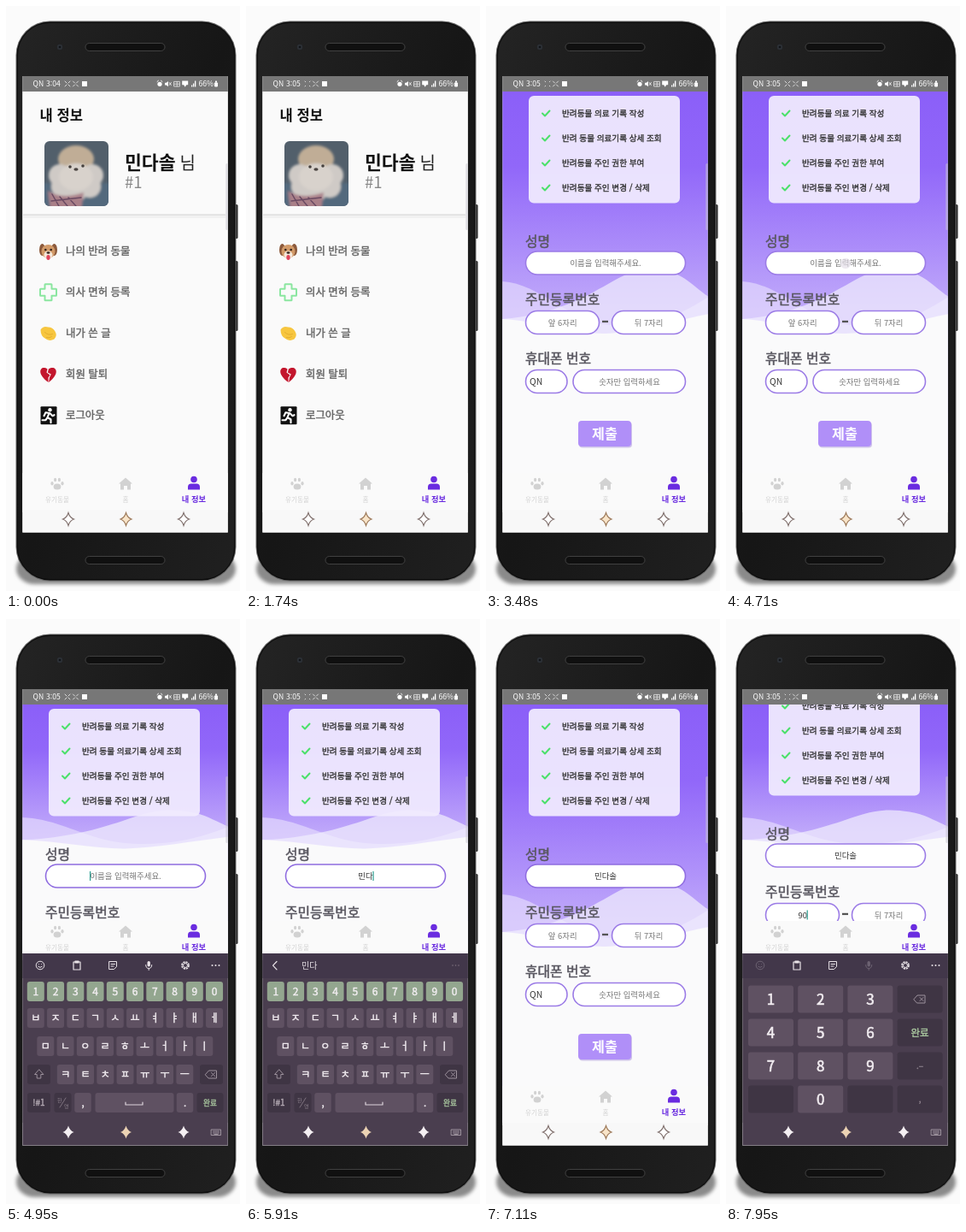
Write an HTML page that moves like this. It is 274x684 px and loops after 8000 ms.

```html
<!DOCTYPE html>
<html lang="ko">
<head>
<meta charset="utf-8">
<title>내 정보</title>
<style>
html, body { margin: 0; width: 100%; height: 100%; overflow: hidden; background: #fbfbfb; }
svg { display: block; width: 100vw; height: 100vh; }
text { font-family: 'Noto Sans CJK KR', 'Noto Sans KR', 'Noto Sans CJK JP', 'Noto Sans', sans-serif; white-space: pre; }
</style>
</head>
<body>
<svg id="stage" viewBox="0 0 274 684" xmlns="http://www.w3.org/2000/svg"></svg>
<script>
const LOOP = 8000, NAME = '민다솔', BRAND = '두두고리', CARRIER = 'QN';
const VIEW = 489, SMALL_VIEW = 291;

// weight 500 is drawn as regular with a thin outline
const text = (x, y, size, str, fill = '#333', weight = 400, anchor = 'start', id = '') =>
  `<text x="${x}" y="${y}" font-size="${size}" fill="${fill}" font-weight="${weight === 500 ? 400 : weight}" text-anchor="${anchor}"` +
  `${weight === 500 ? ` stroke="${fill}" stroke-width="${(size * .035).toFixed(2)}"` : ''}${id && ` id="${id}"`}>${str}</text>`;
const mid = (x, y, size, str, fill, weight, id) => text(x, y, size, str, fill, weight, 'middle', id);
const rect = (x, y, w, h, r, fill, more = '') =>
  `<rect x="${x}" y="${y}" width="${w}" height="${h}" rx="${r}" fill="${fill}" ${more}/>`;
const band = (y, h, fill) => rect(19, y, 242, h, 0, fill);
const dot = (x, y, r, fill, more = '') => `<circle cx="${x}" cy="${y}" r="${r}" fill="${fill}" ${more}/>`;
const oval = (x, y, rx, ry, fill) => `<ellipse cx="${x}" cy="${y}" rx="${rx}" ry="${ry}" fill="${fill}"/>`;
const shape = (d, fill, more = '') => `<path d="${d}" fill="${fill}" ${more}/>`;
const line = (d, color, w = 1) => shape(d, 'none', `stroke="${color}" stroke-width="${w}" stroke-linecap="round" stroke-linejoin="round"`);
const group = (id, body, more = '') => `<g id="${id}" ${more}>${body}</g>`;
const at = (x, y, body) => `<g transform="translate(${x} ${y})">${body}</g>`;

const defs = `<defs>
  <linearGradient id="purple" x1="0" y1="0" x2="0" y2="1">
    <stop offset="0" stop-color="#8b5ff8"/><stop offset=".18" stop-color="#9167f9"/><stop offset=".52" stop-color="#c0a9fa"/>
  </linearGradient>
  <linearGradient id="body" x1="0" y1="0" x2="1" y2="1">
    <stop offset="0" stop-color="#242424"/><stop offset=".5" stop-color="#161616"/><stop offset="1" stop-color="#202020"/>
  </linearGradient>
  <filter id="soft" x="-10%" y="-50%" width="120%" height="200%"><feGaussianBlur stdDeviation="2"/></filter>
  <filter id="fuzzy"><feGaussianBlur stdDeviation="1.5"/></filter>
  <clipPath id="screen"><rect x="19.4" y="82" width="240.3" height="533.6"/></clipPath>
  <clipPath id="view"><rect x="19" y="100" width="242" height="489"/></clipPath>
  <clipPath id="photo"><rect x="45" y="158" width="75" height="76" rx="6"/></clipPath>
</defs>`;

function phone() {
  const pill = y => rect(93, y, 93, 9, 4.5, '#101010', 'stroke="#474747" stroke-width=".9"');
  return rect(12, 640, 257, 36, 22, '#8a8a8a', 'filter="url(#soft)"') +
    rect(267, 232, 4.5, 40, 1.5, '#2b2b2b') + rect(267, 298, 4.5, 82, 1.5, '#2b2b2b') +
    rect(11.5, 17.5, 258, 655, 40, '#6a6a6a') + rect(12.5, 18.5, 256, 653, 39, '#0c0c0c') +
    rect(14, 20, 253, 650, 37, 'url(#body)') +
    pill(43.5) + pill(643.5) + dot(63, 48, 3.2, '#2c3036') + dot(63, 48, 1.3, '#111418');
}

function statusBar() {
  const corners = (x, d) => line(`M${x - 3},${91 - 3}l${d},${d}M${x + 3},88l${-d},${d}M${x - 3},94l${d},${-d}M${x + 3},94l${-d},${-d}`, '#e8e8e8', .9);
  return band(82, 18, '#777') +
    text(31.5, 94.2, 8.6, CARRIER, '#fff') + text(47, 94.2, 8.6, '', '#fff', 400, 'start', 'clock') +
    group('iconIn', corners(72, 2)) + group('iconOut', corners(72, .7)) + corners(81.5, 2) +
    rect(89, 88, 6, 6, 0, '#fff') +
    dot(180, 91.3, 2.6, '#fff') + line('M177,88.5l1.4,-1.2M183,88.5l-1.4,-1.2', '#fff') +
    shape('M186,89.8h1.7l2.2,-1.9v6.4l-2.2,-1.9h-1.7z', '#fff') + line('M191.3,89.6l2,2.8m0,-2.8l-2,2.8', '#fff', .8) +
    line('M197,88.4h6.4v5.6h-6.4zM197,91.2h6.4M200.2,88.4v5.6', '#e8e8e8', .8) +
    shape('M206.2,87.6h7v4.6h-2l-1.5,2.6l-1.5,-2.6h-2z', '#fff') +
    shape('M217,94.5v-2h1.3v2zM219,94.5v-4h1.3v4zM221,94.5v-7h1.3v7z', '#fff') +
    text(225.5, 94.2, 8.6, '66%', '#fff') + rect(244, 89.4, 4, 5, .8, '#fff') + rect(245, 87.6, 2, 2, 0, '#fff');
}

function photo() {
  const tufts = [[63, 198], [101, 198], [66, 211], [98, 211], [82, 216]];
  return `<g clip-path="url(#photo)">` + rect(45, 158, 75, 76, 0, '#525f6b') + `<g filter="url(#fuzzy)">` +
    rect(40, 207, 85, 32, 0, '#53697d') + oval(82, 179, 21, 16, '#c0ad96') +
    tufts.map(([x, y]) => dot(x, y, 13, '#cfcac6')).join('') + oval(82, 200, 20, 16, '#d8d2cc') +
    shape('M49,216Q66,227 91,218L88,238H52z', '#a97f88') + '</g>' +
    line('M54,220L62,234M63,223L72,234M73,224L82,234M53,228L88,224', '#6b4b63', 1.5) +
    dot(75, 188, 1.8, '#45403d') + dot(90, 187, 1.8, '#45403d') + oval(82, 191, 2.6, 1.8, '#4b4542') + '</g>';
}

function profile() {
  const icons = [
    oval(-7, -2, 3.5, 7, '#8c5a3c') + oval(7, -2, 3.5, 7, '#8c5a3c') + dot(0, 0, 8, '#d29a68') + oval(0, 4, 5, 4.5, '#f5e8da') +
      dot(-3.2, -2, 1.3, '#33221c') + dot(3.2, -2, 1.3, '#33221c') + oval(0, 1.5, 2, 1.3, '#33221c') + oval(0, 7, 2.2, 3, '#e0455c'),
    line('M-3.5,-9.5H3.5Q4,-9.5 4,-9V-4H9Q9.5,-4 9.5,-3.5V3.5Q9.5,4 9,4H4V9Q4,9.5 3.5,9.5H-3.5Q-4,9.5 -4,9V4H-9Q-9.5,4 -9.5,3.5V-3.5Q-9.5,-4 -9,-4H-4V-9Q-4,-9.5 -3.5,-9.5z', '#8be6a0', 2),
    shape('M-9,-4Q-6,-9 0,-7Q5,-7 8,-2Q11,3 7,7Q1,10 -4,6Q-9,3 -9,-4z', '#f7c63f') + line('M-4,-1Q0,3 5,1M-2,5Q2,6 4,4', '#e3ad30'),
    shape('M0,9.5C-15,-1 -9,-11 -1,-6L-2,-2L2,1L0,4zM.6,9.5L1.4,4L3.3,.2L-.6,-2L.4,-6C9,-11 15,-1 .6,9.5z', '#c3162d'),
    rect(-9, -10, 19, 21, 1, '#111') + dot(2, -6, 2.2, '#fff') + line('M1,-2L-1,3L3,5V9M-1,3L-3,6H-7M-5,1L-3,-3L2,-2L5,1L7,0', '#fff', 2.1),
  ];
  const labels = ['나의 반려 동물', '의사 면허 등록', '내가 쓴 글', '회원 탈퇴', '로그아웃'];
  return band(100, 489, '#fafafa') + text(39.5, 134, 16.6, '내 정보', '#111', 700) + photo() +
    text(139, 190.5, 21.6, NAME, '#111', 700) + text(203.5, 190.5, 20, '님', '#222', 300) + text(139, 213, 18.5, '#1', '#888', 400) +
    rect(20, 243.5, 237, 1.2, 0, '#d8d8d8') + rect(20, 245, 237, 3, 0, '#f1f1f1') +
    icons.map((icon, i) => at(49.5, 287 + 47.8 * i, icon) + text(70, 291.3 + 47.8 * i, 12.4, labels[i], '#666', 500)).join('');
}

function backdrop() {
  return group('backdrop', rect(-1, 0, 242, VIEW, 0, 'url(#purple)') +
    shape('M-1,222C45,225 75,268 125,273S205,262 241,240V489H-1z', '#e6defd', 'opacity=".65"') +
    shape('M-1,266C60,262 100,238 130,221S175,206 195,211S225,230 241,240V489H-1z', '#f3effe', 'opacity=".7"') +
    shape('M-1,266C40,268 85,284 120,283S200,268 241,260V489H-1z', '#fafafb'));
}

function form() {
  const checks = ['반려동물 의료 기록 작성', '반려 동물 의료기록 상세 조회', '반려동물 주인 권한 부여', '반려동물 주인 변경 / 삭제'];
  const field = (x, y, w, id = '') => rect(x, y, w, 27, 13.5, '#fff', `stroke="#9b7be6" stroke-width="1.6" ${id && `id="${id}"`}`);
  const label = (y, str) => text(46, y, 15.8, str, '#595760', 500);
  return group('form',
    text(61, 72, 12.8, BRAND, '#fff', 700) + text(108.5, 72, 9.4, '의 공식 수의사로 인증 받으면', '#241c38', 500) +
    text(62, 84.2, 9.4, '다음 기능에 대한 권한을 부여 받습니다.', '#241c38', 500) +
    rect(50, 105, 177, 125.5, 6, '#f2ecfe', 'opacity=".93"') +
    checks.map((c, i) => line(`M66,${125.5 + 29 * i}l3,3l5.5,-6`, '#4be06a', 2) + text(89, 128.7 + 29 * i, 9.6, c, '#333', 500)).join('') +
    label(280.5, '성명') + label(349, '주민등록번호') + label(418, '휴대폰 번호') +
    field(46.5, 287, 187, 'nameBox') + field(46.5, 356.5, 86) + field(147.5, 356.5, 86) + field(46.5, 425.5, 48.5) + field(102, 425.5, 131.5) +
    rect(136, 367.8, 7, 2.3, 0, '#555') +
    mid(140, 304, 9.45, '', '#333', 400, 'nameText') + mid(89.7, 373.5, 9.4, '', '#333', 400, 'idText') +
    mid(190.5, 373.5, 9.4, '뒤 7자리', '#777') + text(51, 443.2, 10.4, CARRIER, '#333') + mid(168, 442.7, 9.4, '숫자만 입력하세요', '#777') +
    rect(0, 0, 1.2, 11, 0, '#2a9d8f', 'id="caret"') +
    rect(109, 486.5, 62, 30, 4, '#cfc3ea') + rect(108, 485, 62, 30, 4, '#b08ff8') + mid(139, 506, 16.2, '제출', '#fff', 700));
}

function tabs() {
  const gray = '#d2d2d2', on = '#6a2ce0';
  return group('tabs', band(546, 46, '#fafafa') +
    oval(60, 562, 4.4, 3.6, gray) + [[54, 558.2], [57.6, 554], [62.4, 554], [66, 558.2]].map(([x, y]) => oval(x, y, 1.6, 2.2, gray)).join('') +
    shape('M140,551.5L148,558.5H146V565.5H142V561H138V565.5H134V558.5H132z', gray) +
    dot(220, 553.5, 3.8, on) + shape('M213,565.5V562.5Q213,558.6 217,558.6H223Q227,558.6 227,562.5V565.5z', on) +
    mid(60, 579.6, 7.6, '유기동물', gray) + mid(140, 579.6, 7.6, '홈', gray) + mid(220, 580, 9.3, '내 정보', on, 700));
}

const star = (x, fill, stroke) => at(x, 600, shape('M0,-7.5Q1.7,-1.7 6.5,0Q1.7,1.7 0,7.5Q-1.7,1.7 -6.5,0Q-1.7,-1.7 0,-7.5z', fill, `stroke="${stroke}" stroke-width="1.1"`));
const navBar = () => band(589, 27, '#f8f8f8') + star(73, '#fff', '#80706d') + star(140.5, '#f8e4c8', '#9c7858') + star(208, '#fff', '#80706d');

const KEY = '#5f5162', DARK = '#3f3544', KEY_TEXT = '#f3eef2', GREEN = '#a9c79f';
const keyAt = {};

function key(cx, y, w, h, label, fill = KEY, color = KEY_TEXT, size = 11.5) {
  keyAt[label] = [cx, y + h / 2];
  return rect(cx - w / 2, y, w, h, 3, fill) + mid(cx, y + h / 2 + size * .36, size, label, color, 500);
}
const erase = (x, y) => line(`M${x - 7},${y}l4,-4.5h9v9h-9zM${x},${y - 2}l4,4m0,-4l-4,4`, '#9c919c', 1);

function hangulKeys() {
  const rows = [['1234567890', 34.8, 424], ['ㅂㅈㄷㄱㅅㅛㅕㅑㅐㅔ', 34.8, 455], ['ㅁㄴㅇㄹㅎㅗㅓㅏㅣ', 46.3, 488], ['ㅋㅌㅊㅍㅠㅜㅡ', 69.8, 521]];
  return rows.map(([chars, x, y], r) => [...chars].map((c, i) => key(x + 23.25 * i, y, 20, 23, c, r ? KEY : '#93a68f', KEY_TEXT, 12)).join('')).join('') +
    key(38.5, 521, 27, 23, '', DARK) + line('M38.5,527l-5,5.5h2.7v4.5h4.6v-4.5h2.7z', '#9c919c') +
    key(240.5, 521, 27, 23, '', DARK) + erase(240.5, 532.5) +
    key(38.5, 554, 27, 23, '!#1', DARK, '#b7adb6', 10) + key(66.5, 554, 20, 23, '', DARK) +
    text(60, 565, 6, '한', '#8e838e') + text(68, 572, 6, '영', '#8e838e') + line('M63,571l7,-11', '#8e838e', .8) +
    key(90, 554, 19.5, 23, ',') + key(150.5, 554, 92, 23, '') + line('M140,565v3h20v-3', '#ddd4dc', 1.2) +
    key(209.5, 554, 19.5, 23, '.') + key(239, 554, 31, 23, '완료', DARK, GREEN, 8.6);
}

function numberKeys() {
  const labels = ['1', '2', '3', '', '4', '5', '6', '완료', '7', '8', '9', '.–', '', '0', '', ','];
  return labels.map((c, i) => {
    const col = i % 4, y = 428.5 + 39 * (i >> 2), side = col === 3;
    const size = c === '완료' ? 11.5 : side ? 10 : 17;
    return key(52.5 + 58.2 * col, y, 53, 32, c, side || i === 12 || i === 14 ? DARK : KEY, c === '완료' ? GREEN : side ? '#8e838e' : KEY_TEXT, size);
  }).join('') + erase(227, 444.5);
}

function keyboard() {
  const w = '#e9e3e8';
  const smile = dot(40, 405, 4.8, 'none', `stroke="${w}"`) + line('M37.7,406.3q2.3,2.5 4.6,0M38.3,403.6v.1M41.7,403.6v.1', w);
  const mic = rect(165.5, 400, 3.4, 6.5, 1.7, w) + line('M163.7,404.5q0,4 3.5,4t3.5,-4M167.2,408.5v2', w);
  const tools = group('fades', smile + mic) +
    line('M79,401h8v9h-8zM81,400h4v2h-4z', w, 1.2) + line('M121,400.5h8.5v6l-3,3h-5.5zM123,403.5h4.5M123,406h3', w) +
    dot(210, 405, 4, 'none', `stroke="${w}" stroke-width="1.8" stroke-dasharray="2.2 .94"`) + dot(210, 405, 2.5, 'none', `stroke="${w}"`) +
    [241.5, 245.5, 249.5].map(x => dot(x, 405, 1, w)).join('');
  return group('keyboard', band(391, 225, '#4a3e4f') + band(391, 29, '#42374a') +
    group('tools', tools) +
    group('suggest', line('M36,400.5l-4.5,4.7l4.5,4.7', w, 1.2) + text(65, 409, 10, '', w, 400, 'start', 'hint') + [242, 245.5, 249].map(x => dot(x, 405, .8, '#7d717d')).join('')) +
    group('hangul', hangulKeys()) + group('numbers', numberKeys()) +
    rect(176, 586, 62, 29, 14.5, '#8d858d', 'id="press" opacity=".8"') +
    star(73, '#f4eff2', 'none') + star(140.5, '#ecd3b4', 'none') + star(208, '#f4eff2', 'none') +
    line('M240.5,597h11v6.5h-11zM242.5,599h7M242.5,601h7M244,602.6h4', '#a89da8', .9));
}

document.getElementById('stage').innerHTML = defs + phone() + '<g clip-path="url(#screen)">' +
  band(82, 534, '#fafafa') + group('profile', profile()) +
  group('formPage', backdrop() + form(), 'clip-path="url(#view)"') + tabs() + navBar() +
  rect(257.3, 184, 3, 78, 1.5, '#c9c6cf', 'opacity=".55"') + statusBar() + keyboard() +
  dot(0, 0, 6.5, '#e3dde8', 'id="touch" opacity=".65" stroke="#fff" stroke-width=".8"') + '</g>';

const $ = {};
document.querySelectorAll('[id]').forEach(e => $[e.id] = e);
const show = (e, on) => e.setAttribute('display', on ? 'inline' : 'none');
const move = (e, x, y) => e.setAttribute('transform', `translate(${x} ${y})`);
const ramp = (t, a, b) => Math.min(1, Math.max(0, (t - a) / (b - a)));
const easeOut = p => 1 - (1 - p) ** 3;

// keystrokes: time, key, resulting field value
const nameKeys = ['ㅁ', 'ㅣ', 'ㄴ', 'ㄷ', 'ㅏ', 'ㅅ', 'ㅗ', 'ㄹ'];
const nameSteps = ['ㅁ', '미', '민', '민ㄷ', '민다', '민닷', '민다소', NAME].map((v, i) => [5080 + 185 * i, nameKeys[i], v]);
const idSteps = [[7680, '9', '9'], [7830, '0', '90']];
const FOCUS_NAME = 4760, FOCUS_ID = 7460;
const taps = [[1980, 2070, 105, 335], [4710, 4770, 140, 301], [6690, 6790, 219, 601], [7410, 7470, 90, 370],
  ...[...nameSteps, ...idSteps].map(([t, k]) => [t, t + 70, ...keyAt[k]])];
const iconFlips = [780, 1980, 3180, 4440, 5640, 6810, 7170];

const valueAt = (steps, t) => steps.reduce((v, s) => t >= s[0] ? s[2] : v, '');
const nameHint = '이름을 입력해주세요.', idHint = '앞 6자리';

function scrollAt(t) {
  return 80 - 31 * ramp(t, 2500, 2850) - 49 * easeOut(ramp(t, 2850, 3060));
}

function setField(e, value, hint) {
  e.textContent = value || hint;
  e.setAttribute('fill', value ? '#333' : '#777');
}

function draw(t) {
  const onForm = t >= 2220, numeric = t >= 7200;
  const rise = numeric ? easeOut(ramp(t, FOCUS_ID, FOCUS_ID + 130))
    : easeOut(ramp(t, FOCUS_NAME, FOCUS_NAME + 130)) * (1 - ramp(t, 6790, 6930) ** 2);
  const open = rise > .5;
  const dy = numeric && open ? -24 : scrollAt(t);

  $.clock.textContent = t < 780 ? '3:04' : '3:05';
  const flipped = iconFlips.filter(f => t >= f).length % 2 === 1;
  show($.iconIn, !flipped);
  show($.iconOut, flipped);

  show($.profile, !onForm);
  show($.formPage, onForm);
  $.backdrop.setAttribute('transform', `translate(20 100) scale(1 ${open ? SMALL_VIEW / VIEW : 1})`);
  move($.form, 0, dy);
  move($.tabs, 0, open ? -193 : 0);

  const name = valueAt(nameSteps, t), id = valueAt(idSteps, t), onId = t >= FOCUS_ID;
  setField($.nameText, name, nameHint);
  setField($.idText, id, idHint);
  $.nameBox.setAttribute('stroke', t >= FOCUS_NAME && !onId ? '#8f6ce0' : '#9b7be6');

  const [field, value, cx, cy] = onId ? [$.idText, id, 89.7, 364.5] : [$.nameText, name, 140, 295];
  const half = onForm ? field.getComputedTextLength() / 2 : 0;
  move($.caret, cx + (value ? half : -half) - .3, cy);
  const typing = [...nameSteps, ...idSteps].some(s => t >= s[0] && t < s[0] + 300);
  show($.caret, t >= FOCUS_NAME && (typing || Math.floor((t + 30) / 300) % 2 === 0));

  show($.keyboard, rise > 0);
  move($.keyboard, 0, 225 * (1 - rise));
  show($.hangul, !numeric);
  show($.numbers, numeric);
  const composing = name !== '' && !numeric;
  show($.tools, !composing);
  show($.suggest, composing);
  $.hint.textContent = name;
  $.fades.setAttribute('opacity', numeric ? .25 : 1);
  show($.press, t >= 6690 && t < 6850);

  const tap = taps.find(([a, b]) => t >= a && t < b);
  const drag = t >= 2500 && t < 2910;
  show($.touch, tap || drag);
  if (drag) move($.touch, 219, 248 + dy);
  else if (tap) move($.touch, tap[2], tap[3]);
}

const start = performance.now();
function tick() {
  draw((performance.now() - start) % LOOP);
  requestAnimationFrame(tick);
}
tick();
</script>
</body>
</html>
```
